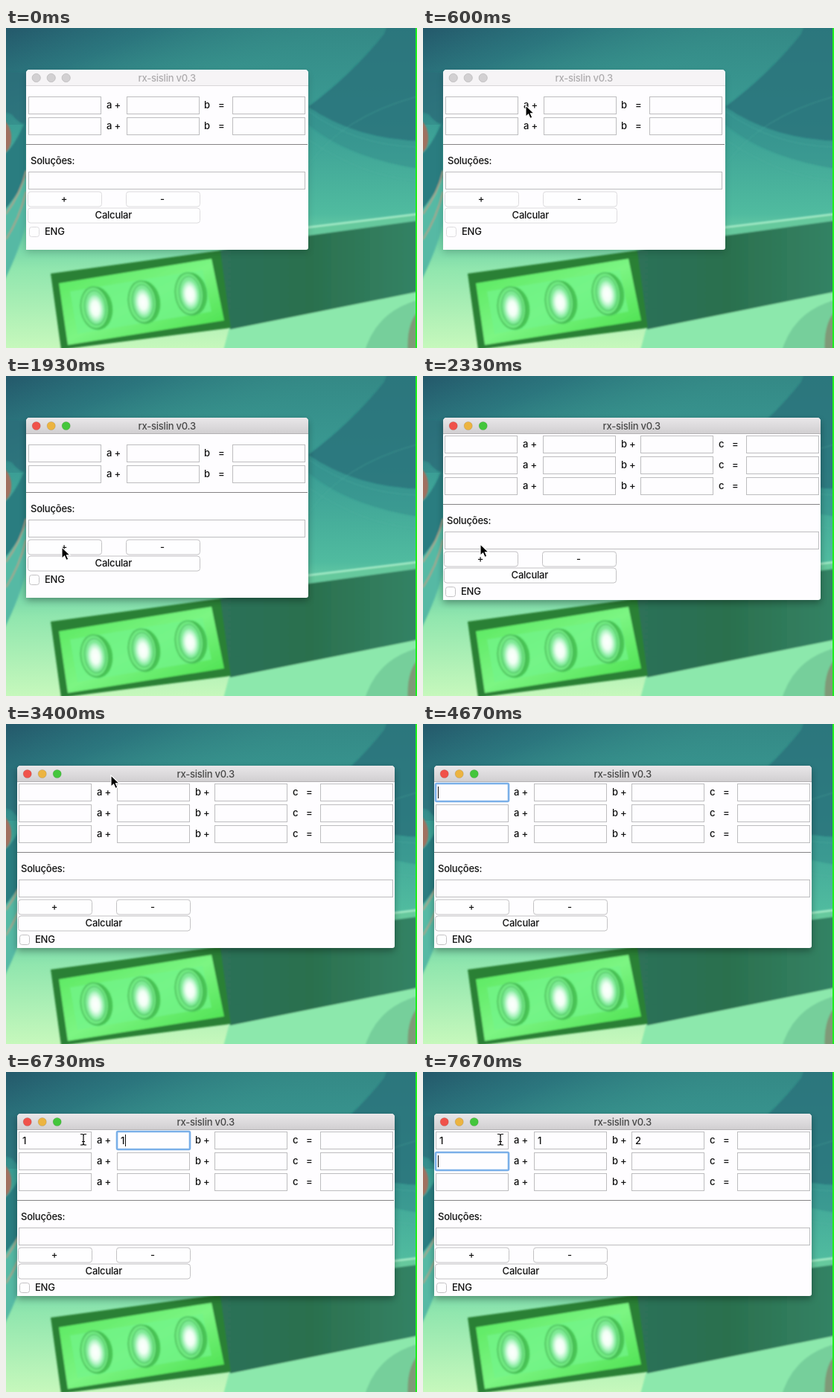
Write an HTML page that moves like this. It is 552 by 430 pixels and loops after 8000 ms.

```html
<!DOCTYPE html>
<html lang="pt">
<head>
<meta charset="utf-8">
<title>rx-sislin v0.3</title>
<style>
  html, body { margin: 0; width: 552px; height: 430px; overflow: hidden; }
  svg { display: block; }
  text { font: 500 13px Inter, "Open Sans", sans-serif; letter-spacing: -.22px; fill: #111; white-space: pre; }
  .mid { text-anchor: middle; }
  .field { fill: #fefdff; stroke: #bdbdbf; }
  .button { fill: #fefeff; stroke: #c3c2c4; }
  .idle .button { stroke: #dddcde; }
  .ring { fill: #fefdff; stroke: #7aafe8; stroke-width: 2.6; }
</style>
</head>
<body>
<svg width="552" height="430" viewBox="0 0 552 430">
  <defs>
    <linearGradient id="sky" x2="0" y2="1">
      <stop offset="0" stop-color="#348986"/>
      <stop offset=".3" stop-color="#3b9e95"/>
      <stop offset=".58" stop-color="#50bb9f"/>
      <stop offset=".75" stop-color="#90e6ae"/>
      <stop offset="1" stop-color="#c6f8bc"/>
    </linearGradient>
    <linearGradient id="shade" x2=".62" y2=".35">
      <stop offset="0" stop-color="#235669" stop-opacity=".95"/>
      <stop offset=".45" stop-color="#266a78" stop-opacity=".65"/>
      <stop offset="1" stop-color="#348986" stop-opacity="0"/>
    </linearGradient>
    <linearGradient id="slab">
      <stop offset="0" stop-color="#2d7159"/>
      <stop offset=".45" stop-color="#2b704e"/>
      <stop offset="1" stop-color="#348466"/>
    </linearGradient>
    <linearGradient id="panel" x2="1" y2="1">
      <stop offset="0" stop-color="#55e65a"/>
      <stop offset=".5" stop-color="#7cf583"/>
      <stop offset="1" stop-color="#42dc43"/>
    </linearGradient>
    <radialGradient id="lamp">
      <stop offset="0" stop-color="#fff"/>
      <stop offset=".45" stop-color="#f1fff4"/>
      <stop offset=".75" stop-color="#b4f5c6"/>
      <stop offset="1" stop-color="#75e78d"/>
    </radialGradient>
    <linearGradient id="bar" x2="0" y2="1">
      <stop offset="0" stop-color="#e9e7e9"/>
      <stop offset="1" stop-color="#d0ced0"/>
    </linearGradient>
    <filter id="blur" x="-20%" y="-20%" width="140%" height="140%"><feGaussianBlur stdDeviation="5"/></filter>
    <filter id="soft"><feGaussianBlur stdDeviation="1"/></filter>
  </defs>

  <g id="backdrop">
    <path fill="url(#sky)" d="M0 0H552V430H0Z"/>
    <path fill="url(#shade)" d="M0 0H552V130H0Z"/>
    <g filter="url(#soft)">
      <path fill="#2a747c" opacity=".85" d="M508 8Q465 62 406 106Q470 150 560 152V-8H514Z"/>
      <path fill="#31898a" opacity=".5" d="M406 106Q470 150 560 152V190Q460 175 406 130Z"/>
      <path fill="none" stroke="#58b3a5" opacity=".4" d="M406 112Q470 158 552 160M406 150Q480 200 552 205M406 185Q450 120 552 92"/>
      <path fill="#2a6f7a" d="M-5 60H28V130Q16 128 8 116L-5 112Z" opacity=".8"/>
      <path fill="#2c7d80" d="M-5 172Q12 160 27 122V205Q14 230 -5 248Z"/>
      <path fill="#57b9a4" d="M-5 248Q14 228 27 200V262Q18 300 -5 345Z"/>
      <path fill="#a0705f" d="M-5 122Q8 132 7 150Q7 163 -5 170Z"/>
      <path fill="none" stroke="#a9a58a" stroke-width="2" d="M0 250Q20 222 27 192M0 284Q18 256 27 220"/>
      <path fill="#8ce8ac" d="M300 403L560 352V440H290Z"/>
      <path fill="#76cf9b" d="M480 440Q496 378 560 364V440Z"/>
      <path fill="#7f9a78" d="M540 440Q536 392 560 374V440Z"/>
      <path fill="#66c99d" d="M400 270L560 249V262L400 284Z"/>
      <path fill="url(#slab)" d="M286 299L406 279L560 258V353L301 405Z"/>
      <path fill="none" stroke="#a5ecc8" stroke-width="2.5" d="M404 268L560 249"/>
      <path fill="#2a8036" d="M60 330L288 299L302 403L74 432Z"/>
      <path fill="url(#panel)" d="M71 343L276 310L293 393L83 426Z"/>
      <path fill="#72f48a" opacity=".75" d="M86 354L264 325L276 381L96 411Z"/>
    </g>
    <g id="lamps" filter="url(#soft)"></g>
    <path fill="#1cf01c" d="M550 0H552V430H550Z"/>
  </g>
  <g id="win"></g>
  <g id="pointer"></g>
</svg>
<script>
const LOOP = 8000, STEP = 1000 / 15;
const $ = id => document.getElementById(id);

// time, x, y of the pointer tip
const PATH = [
  [70, 262, 330], [330, 196, 188], [600, 138, 104], [870, 131, 112], [930, 131, 112],
  [1270, 126, 120], [1530, 126, 120], [1800, 78, 226], [1930, 75, 230], [2200, 75, 229],
  [2330, 77, 226], [2400, 77, 226], [2870, 160, 58], [3070, 157, 62], [3130, 153, 69],
  [3270, 153, 69], [3400, 141, 69], [5600, 141, 69], [5930, 115, 92], [6200, 104, 91], [8000, 104, 91]
];
const DRAG = [[0, 27], [3200, 27], [3400, 15], [8000, 15]];

// time, row, column of keyboard focus
const FOCUS = [[4667, 0, 0], [4800, 0, 1], [5333, 0, 2], [6267, 0, 0], [6733, 0, 1], [7000, 0, 2], [7600, 1, 0]];
// time, row, column, typed text
const TYPED = [[5000, 0, 1, "1"], [6533, 0, 0, "1"], [7267, 0, 2, "2"]];

const LAYOUT = {
  2: { w: 379, h: 242, left: 3, top: 92, sep: 156, cols: [3, 135, 277], end: 375, signs: [[108, "a +"], [239, "b"], [258, "="]] },
  3: { w: 507, h: 245, left: 2, top: 80, sep: 172, cols: [2, 134, 265, 407], end: 505, signs: [[107, "a +"], [239, "b +"], [370, "c"], [388, "="]] }
};

function track(keys, t) {
  if (t <= keys[0][0]) return keys[0].slice(1);
  const i = keys.findIndex(k => k[0] >= t), a = keys[i - 1], b = keys[i];
  const u = (t - a[0]) / (b[0] - a[0]);
  return a.slice(1).map((v, j) => v + (b[j + 1] - v) * u);
}
const rect = (cls, x, y, w, h, r = 0) =>
  `<rect class="${cls}" x="${x + .5}" y="${y + .5}" width="${w}" height="${h}" rx="${r}"/>`;
const label = (x, y, s, cls = "", color = "#111") =>
  `<text class="${cls}" x="${x}" y="${y}" style="fill:${color}">${s}</text>`;

function frame(L, active) {
  const { w, h } = L;
  const shape = `M0 ${56 + h}V61Q0 56 5 56H${w - 5}Q${w} 56 ${w} 61V${56 + h - 3}Q${w} ${56 + h} ${w - 3} ${56 + h}Z`;
  const lights = ["#f0524a", "#ecb441", "#44c63c"].map((c, i) =>
    `<circle cx="${13.7 + 20 * i}" cy="67" r="5.6" fill="${active ? c : "#d2d0d2"}" stroke="${active ? "#0002" : "#bcbabc"}" stroke-width=".8"/>`);
  return `<path d="${shape}" transform="translate(0 4)" opacity="${active ? .32 : .16}" filter="url(#blur)"/>
    <path d="${shape}" fill="#fefdff"/>
    <path d="M0 78V61Q0 56 5 56H${w - 5}Q${w} 56 ${w} 61V78Z" fill="${active ? "url(#bar)" : "#f6f4f6"}"/>
    <path d="M0 77.5H${w}" stroke="${active ? "#b3b1b3" : "#d8d6d8"}"/>` + lights.join("") +
    label(w / 2 - .3, 72, "rx-sislin v0.3", "mid", active ? "#484848" : "#adabad");
}

function form(L, n, t) {
  const focus = FOCUS.filter(f => f[0] <= t).pop();
  const typed = TYPED.filter(k => k[0] <= t);
  let out = "";
  for (let r = 0; r < n; r++) {
    const y = L.top + 28 * r;
    L.cols.forEach((x, c) => {
      const here = k => k[1] === r && k[2] === c;
      const on = focus && here(focus), entry = typed.find(here);
      out += on ? rect("ring", x - .5, y - .5, 98, 24, 1.5) : rect("field", x, y, 97, 23);
      if (entry) out += label(x + 5, y + 17, entry[3]);
      if (on) {
        const since = Math.max(focus[0], ...typed.filter(here).map(k => k[0]));
        if ((t - since) % 900 < 610)
          out += `<path d="M${x + (entry ? 11.5 : 3.5)} ${y + 4}v16" stroke="#111"/>`;
      }
    });
    L.signs.forEach(([x, s]) => out += label(x, y + 16, s));
  }
  const x = L.left, y = L.sep;
  return out + `<path d="M0 ${y + .5}H${L.w - 1}" stroke="#858385"/>` +
    label(x + 3, y + 27, "Soluções:") +
    rect("field", x, y + 37, L.end - x - 1, 23) +
    rect("button", x - 1, y + 63.5, 99, 20, 3.5) + label(x + 48, y + 78, "+", "mid") +
    rect("button", x + 131, y + 63.5, 99, 20, 3.5) + label(x + 180, y + 78, "-", "mid") +
    rect("button", x - 1, y + 85.5, 231, 20, 3.5) + label(x + 114.3, y + 100, "Calcular", "mid") +
    rect("button", x + 1, y + 111, 13, 13, 3) + label(x + 22, y + 122, "ENG");
}

const ARROW = `<path d="M0 0V15.2L3.6 11.9L6 17.5L8.8 16.3L6.4 10.8H11.2Z" fill="#000" stroke="#fff" stroke-width="1.1"/>`;
const BEAM_PATH = "M-4 -7.5H-2Q0 -7.5 0 -5.5Q0 -7.5 2 -7.5H4M0 -6V6M-4 7H-2Q0 7 0 5Q0 7 2 7H4M-2 2.5H2";
const BEAM = `<path d="${BEAM_PATH}" fill="none" stroke="#fff" stroke-width="2.6" opacity=".8"/>
  <path d="${BEAM_PATH}" fill="none" stroke="#000" stroke-width="1.2"/>`;

function overField(L, n, x, y) {
  const row = (y - L.top) / 28;
  return row >= 0 && row < n && (y - L.top) % 28 <= 24 && L.cols.some(c => x >= c && x <= c + 98.5);
}

function render(t) {
  const n = t < 2195 ? 2 : 3, L = LAYOUT[n], active = t >= 995;
  const [left] = track(DRAG, t).map(Math.round);
  $("win").setAttribute("transform", `translate(${left} 0)`);
  $("win").setAttribute("class", active ? "" : "idle");
  $("win").innerHTML = frame(L, active) + form(L, n, t);

  const [x, y] = track(PATH, t);
  const hidden = t < 65 || (t >= 4665 && t < 5595);
  const beam = active && overField(L, n, x - left, y);
  $("pointer").setAttribute("transform", `translate(${Math.round(x)} ${Math.round(y)})`);
  $("pointer").innerHTML = hidden ? "" : beam ? BEAM : ARROW;
}

$("lamps").innerHTML = [[119, 376], [183, 368], [246, 357]].map(([x, y]) =>
  `<g transform="translate(${x} ${y}) rotate(-7)">
    <ellipse cx="3" cy="1" rx="21" ry="29" fill="#48c455"/>
    <ellipse rx="18.5" ry="28" fill="#70e980" stroke="#45b452" stroke-width="1.3"/>
    <ellipse cx="1" rx="14" ry="23" fill="#7feb94" stroke="#4cb963"/>
    <ellipse cx="1" cy="1" rx="12" ry="20.5" fill="url(#lamp)"/>
  </g>`).join("");

let last = -1;
const start = performance.now();
function tick() {
  const t = (performance.now() - start) % LOOP;
  const step = Math.floor((t + 5) / STEP) % (LOOP / STEP);
  if (step !== last) render(Math.round((last = step) * STEP));
  requestAnimationFrame(tick);
}
tick();
</script>
</body>
</html>
```
